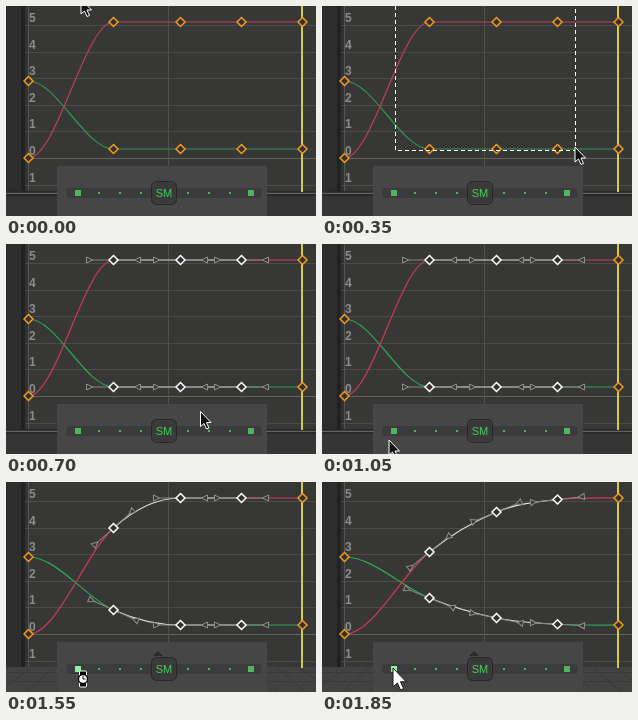
Recreate the animation shown at these times as an HTML page with a canvas. Size 310 px wide and 210 px high, loop 2100 ms.

```html
<!DOCTYPE html>
<html lang="en">
<head>
<meta charset="utf-8">
<title>Smoothing keys in a graph editor</title>
<style>
html, body { margin: 0; width: 100%; height: 100%; overflow: hidden; background: #373735; }
canvas { display: block; width: 310px; height: 210px; }
</style>
</head>
<body>
<canvas id="stage"></canvas>
<script>
const W = 310, H = 210, LOOP = 2100, STEP = 50;
const canvas = document.getElementById('stage');
const ratio = window.devicePixelRatio || 1;
canvas.width = W * ratio;
canvas.height = H * ratio;
const ctx = canvas.getContext('2d');
ctx.scale(ratio, ratio);

const keyX = [22.5, 107.5, 174.5, 235.5, 296.5];
const GREEN = '#4fb560';

function rect(x, y, w, h, color) {
  ctx.fillStyle = color;
  ctx.fillRect(x, y, w, h);
}

function path(points, { stroke, fill, width = 1, close = false }) {
  ctx.beginPath();
  points.forEach(([x, y]) => ctx.lineTo(x, y));
  if (close) ctx.closePath();
  if (fill) { ctx.fillStyle = fill; ctx.fill(); }
  if (stroke) { ctx.strokeStyle = stroke; ctx.lineWidth = width; ctx.stroke(); }
}

function rounded(x, y, w, h, r, fill, stroke) {
  ctx.beginPath();
  ctx.roundRect(x, y, w, h, r);
  ctx.fillStyle = fill;
  ctx.fill();
  if (stroke) { ctx.strokeStyle = stroke; ctx.lineWidth = 1; ctx.stroke(); }
}

// Position between timed points [time, x, y].
function along(points, t) {
  if (t <= points[0][0]) return points[0].slice(1);
  for (let i = 1; i < points.length; i++) {
    const [t0, x0, y0] = points[i - 1], [t1, x1, y1] = points[i];
    if (t <= t1) {
      const k = (t - t0) / (t1 - t0);
      return [x0 + (x1 - x0) * k, y0 + (y1 - y0) * k];
    }
  }
  return points[points.length - 1].slice(1);
}

function background(refreshed) {
  rect(0, 0, W, H, '#373735');
  rect(0, 0, 16, 187, '#2d2d2d');
  rect(15, 0, 4, 187, '#222222');
  rect(19, 0, 3, 187, '#323231');
  for (let value = -1; value <= 5; value++) {
    const y = Math.round(152 - value * 26.6);
    rect(19, y, W - 19, 1, value ? '#4b4b49' : '#626260');
    ctx.fillStyle = '#8c8c8a';
    ctx.font = 'bold 12px "Liberation Sans", Arial, sans-serif';
    ctx.textAlign = 'left';
    ctx.fillText(Math.abs(value), 23, y - 3);
  }
  rect(22, 0, 1, 187, '#555553');
  rect(162, 0, 1, 187, '#4f4f4d');

  if (refreshed) {
    rect(0, 185, W, 25, '#424242');
    for (let x = -120; x <= 430; x += 28)
      path([[155 + (x - 155) * 0.8, 186], [x, 210]], { stroke: '#383838' });
    for (const y of [190, 199]) rect(0, y, W, 1, '#393939');
  } else {
    rect(0, 186, W, 24, '#353535');
    rect(0, 185, W, 1, '#292929');
    rect(0, 187, W, 1, '#646464');
    rect(0, 188, W, 2, '#282828');
  }
  rect(295, 0, 2, 186, '#d5cc45');
}

// A key is flat at an extremum or next to an equal key.
function slopesOf(y) {
  return y.map((v, i) => {
    if (i === 0 || i === y.length - 1 || (v - y[i - 1]) * (y[i + 1] - v) <= 0) return 0;
    return (y[i + 1] - y[i - 1]) / (keyX[i + 1] - keyX[i - 1]);
  });
}

function segment(y, slopes, i, color) {
  const x0 = keyX[i], x1 = keyX[i + 1], third = (x1 - x0) / 3;
  ctx.beginPath();
  ctx.moveTo(x0, y[i]);
  ctx.bezierCurveTo(x0 + third, y[i] + slopes[i] * third,
    x1 - third, y[i + 1] - slopes[i + 1] * third, x1, y[i + 1]);
  ctx.strokeStyle = color;
  ctx.lineWidth = 1.2;
  ctx.stroke();
}

function handle(x, y, slope, side) {
  ctx.save();
  ctx.translate(x, y);
  ctx.rotate(Math.atan(slope));
  ctx.scale(side, 1);
  path([[0, 0], [22, 0]], { stroke: '#858583' });
  path([[21, 0], [27, -3], [27, 3]], { stroke: '#8f8f8d', fill: '#373735', close: true });
  ctx.restore();
}

function diamond(x, y, color) {
  path([[x, y - 4.5], [x + 4.5, y], [x, y + 4.5], [x - 4.5, y]],
    { stroke: color, fill: '#32312f', width: 1.5, close: true });
}

function curve(y, color, selected) {
  const slopes = slopesOf(y);
  for (let i = 0; i < 4; i++)
    segment(y, slopes, i, selected && (i === 1 || i === 2) ? '#e4e4e2' : color);
  if (selected)
    for (let i = 1; i < 4; i++)
      for (const side of [-1, 1]) handle(keyX[i], y[i], slopes[i], side);
  keyX.forEach((x, i) =>
    diamond(x, y[i], selected && i > 0 && i < 4 ? '#ffffff' : '#f09a1e'));
}

function toolPanel(hover, marker) {
  rect(51, 160, 210, 50, '#464646');
  rounded(60, 182, 196, 10, 4, '#3b3b3b');
  rect(69, 184, 6, 6, hover ? '#8df0a0' : GREEN);
  rect(242, 184, 6, 6, GREEN);
  for (const x of [93, 114, 135, 182, 203, 224]) rect(x - 1, 186, 2, 2, GREEN);
  if (marker) path([[147, 174], [152, 169], [157, 174]], { fill: '#292929', close: true });
  rounded(145.5, 175.5, 25, 23, 5, '#3a3a3a', '#272727');
  ctx.fillStyle = '#45cc5c';
  ctx.font = '11px "Liberation Sans", Arial, sans-serif';
  ctx.textAlign = 'center';
  ctx.fillText('SM', 158, 191);
}

function arrow(x, y, fill, stroke, size = 1) {
  const shape = [[0, 0], [0, 15], [3.5, 12], [6, 17.5], [8.5, 16.5], [6, 11], [10.5, 11]];
  path(shape.map(([dx, dy]) => [x + dx * size, y + dy * size]),
    { fill, stroke, close: true });
}

function watch(x, y) {
  rounded(x - 3.5, y - 8, 7, 16, 1, '#000', '#fff');
  ctx.beginPath();
  ctx.arc(x, y, 4.5, 0, Math.PI * 2);
  ctx.fillStyle = '#fff';
  ctx.fill();
  ctx.strokeStyle = '#000';
  ctx.lineWidth = 1.3;
  ctx.stroke();
  path([[x, y - 3], [x, y], [x + 2.5, y]], { stroke: '#000' });
}

const pointer = [
  [0, 75, -7], [50, 73, -6], [100, 73, -3], [350, 253, 141], [400, 253, 142],
  [550, 253, 154], [850, 136, 181], [1000, 136, 181], [1050, 67, 196], [1200, 71, 186]
];

function cursor(t) {
  const [x, y] = along(pointer, t);
  if (t >= 1350 && t < 1850) watch(77, 197);
  else if (t >= 1850) arrow(71, 186, '#fff', '#1a1a1a', 1.25);
  else if (t === 550) {
    path([[x, y], [x + 4, y + 4], [x + 1, y + 5]], { fill: '#eee', close: true });
    path([[x + 5, y + 11], [x + 9, y + 18]], { stroke: '#ccc' });
  } else arrow(x, y, '#111', '#fff');
}

function marquee(t) {
  if (t < 100 || t >= 450) return;
  const [x, y] = along(pointer, t);
  ctx.setLineDash([4, 3]);
  path([[73.5, 0], [73.5, Math.round(y) + 3.5], [Math.round(x) + 0.5, Math.round(y) + 3.5],
    [Math.round(x) + 0.5, 0]], { stroke: '#fff' });
  ctx.setLineDash([]);
}

// Offset of the three selected keys after each smoothing pass.
function smoothing(t) {
  if (t < 1450) return [0, 0, 0];
  if (t < 1600) return [30, 0, 0];
  if (t < 1800) return [45, 6.5, 0];
  return [54, 14, 1.5];
}

function draw(t) {
  const selected = t >= 600, offset = smoothing(t);
  background(t >= 1350);
  curve([75, ...offset.map(d => 143 - d / 2), 143], selected ? '#2fa457' : '#329452', selected);
  curve([152, ...offset.map(d => 16 + d), 16], selected ? '#d03a58' : '#bd4058', selected);
  toolPanel(t >= 1150, t >= 1200);
  marquee(t);
  cursor(t);
}

const start = performance.now();
function tick() {
  const elapsed = (performance.now() - start) % LOOP;
  draw(Math.floor(elapsed / STEP) * STEP);
  requestAnimationFrame(tick);
}
tick();
</script>
</body>
</html>
```
